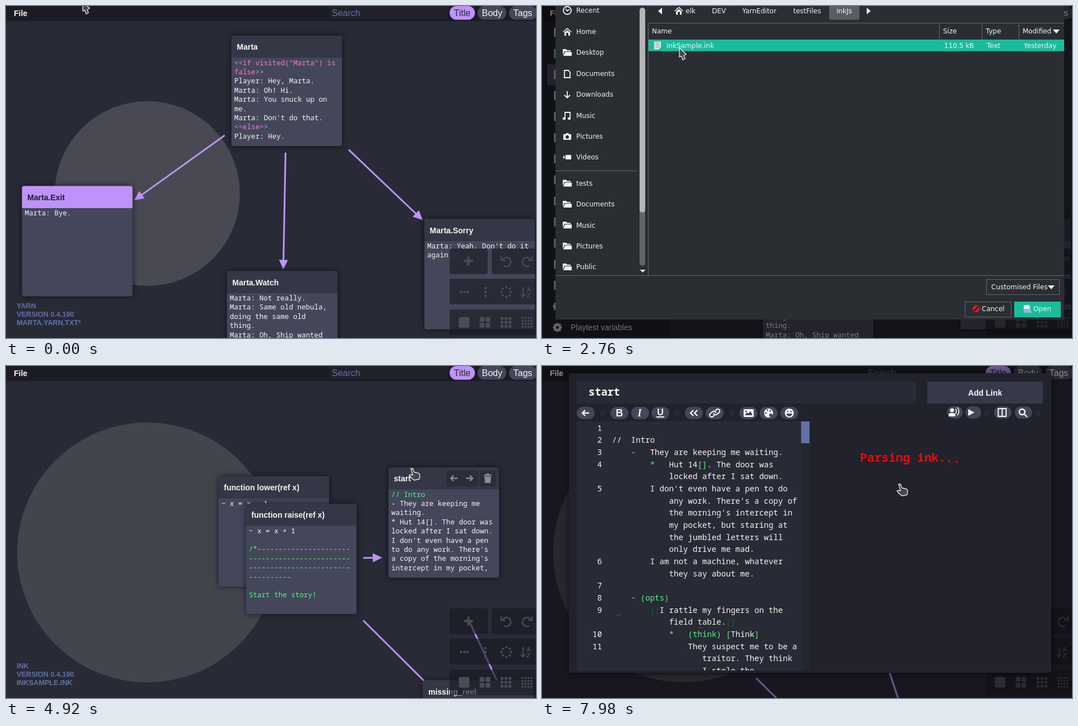
Recreate the animation shown at these times as an HTML page with a canvas. Size 945x593 px, loop 8000 ms.

```html
<!DOCTYPE html>
<html lang="en">
<head>
<meta charset="utf-8">
<title>Story editor</title>
<style>
html, body { margin: 0; width: 100%; height: 100%; overflow: hidden; background: #282a36; }
canvas { display: block; }
</style>
</head>
<body>
<canvas id="stage" width="945" height="593"></canvas>
<script>
const g = document.getElementById('stage').getContext('2d');
const SANS = '"Liberation Sans", Arial, sans-serif';
const MONO = '"Noto Sans Mono", "DejaVu Sans Mono", monospace';
const DIALOG = '"DejaVu Sans", sans-serif';
const BG = '#282a36', LIGHT = '#f8f8f2', PURPLE = '#bd93f9', BLUE = '#6272a4',
      GREEN = '#50fa7b', BODY = '#44475a', DARK = '#21222c', TEAL = '#1abc9c';
const LOOP = 8000, STEP = 60, NODE = 197;

// ---- helpers
const clamp = v => Math.max(0, Math.min(1, v));
const ramp = (t, a, b) => clamp((t - a) / (b - a));

function track(keys, t) {
  const i = keys.findIndex(k => k[0] > t);
  if (i === 0) return keys[0].slice(1);
  if (i < 0) return keys.at(-1).slice(1);
  const a = keys[i - 1], b = keys[i];
  const u = ramp(t, a[0], b[0]), e = u * u * (3 - 2 * u);
  return [a[1] + (b[1] - a[1]) * e, a[2] + (b[2] - a[2]) * e];
}

function box(x, y, w, h, color, r = 0) {
  g.fillStyle = color;
  g.beginPath();
  g.roundRect(x, y, w, h, r);
  g.fill();
}

function disc(x, y, r, color) {
  box(x - r, y - r, 2 * r, 2 * r, color, r);
}

// y is the middle of the capitals; the baseline sits on a whole pixel
function text(s, x, y, color, size, font = SANS, weight = '', align = 'left') {
  g.font = `${weight} ${size}px ${font}`;
  g.textAlign = align;
  g.fillStyle = color;
  g.fillText(s, x, Math.round(y + size * 0.36));
}

function path(d, x, y, fill, stroke, width = 2) {
  const p = new Path2D(d);
  g.save();
  g.translate(x, y);
  if (fill) { g.fillStyle = fill; g.fill(p); }
  if (stroke) { g.strokeStyle = stroke; g.lineWidth = width; g.stroke(p); }
  g.restore();
}

const line = (x1, y1, x2, y2, color, width = 1) =>
  path(`M${x1} ${y1}L${x2} ${y2}`, 0, 0, null, color, width);

function withAlpha(a, draw) {
  if (a <= 0) return;
  g.save();
  g.globalAlpha = a;
  draw();
  g.restore();
}

function shadowBox(...args) {
  g.save();
  g.shadowColor = 'rgba(0,0,0,.6)';
  g.shadowBlur = 12;
  box(...args);
  g.restore();
}

const LEFT = 'M6 0H-6M-1 -5L-6 0L-1 5', RIGHT = 'M-6 0H6M1 -5L6 0L1 5';
const PLAY = 'M-5 -6L6 0L-5 6Z';
const dim = a => box(0, 0, 945, 593, `rgba(0,0,0,${a})`);

// ---- graph
const yarnNodes = [
  { x: 402, y: 53, title: 'Marta', lines: ['<<if visited("Marta") is', 'false>>', 'Player: Hey, Marta.', 'Marta: Oh! Hi.',
    'Marta: You snuck up on', 'me.', "Marta: Don't do that.", '<<else>>', 'Player: Hey.'] },
  { x: 28.5, y: 321.5, title: 'Marta.Exit', selected: true, lines: ['Marta: Bye.'] },
  { x: 394, y: 473.5, title: 'Marta.Watch', lines: ['Marta: Not really.', 'Marta: Same old nebula,', 'doing the same old', 'thing.', 'Marta: Oh, Ship wanted'] },
  { x: 746, y: 380.5, title: 'Marta.Sorry', lines: ["Marta: Yeah. Don't do it", 'again.'] }
];
const dashes = '-'.repeat(24);
const inkNodes = [
  { x: 743.5, y: 561.5, title: 'missing_reel', lines: [] },
  { x: 379, y: 197, title: 'function lower(ref x)', lines: ['~ x = x - 1'] },
  { x: 428, y: 246, title: 'function raise(ref x)', lines: ['~ x = x + 1', '', '/*' + dashes.slice(2), dashes, dashes, dashes.slice(14), '', 'Start the story!'] },
  { x: 674, y: 242, title: 'start', lines: ['// Intro', '- They are keeping me', 'waiting.', '* Hut 14[]. The door was', 'locked after I sat down.',
    "I don't even have a pen", "to do any work. There's", "a copy of the morning's", 'intercept in my pocket,'] }
];

function bodyLine(s, x, y) {
  if (/^<<|>>$/.test(s)) {
    let at = x;
    for (const part of s.split(/(<<|>>)/)) {
      text(part, at, y, /<<|>>/.test(part) ? PURPLE : '#ff79c6', 12.55, MONO);
      at += g.measureText(part).width;
    }
  } else text(s, x, y, /^(\/\/|\/\*|--|Start)/.test(s) ? GREEN : LIGHT, 12.55, MONO);
}

function drawNode(n, hover) {
  const { x, y } = n;
  shadowBox(x, y, NODE, NODE, BODY, 4);
  box(x, y, NODE, 39.5, n.selected ? PURPLE : '#343746', [4, 4, 0, 0]);
  text(n.title, x + 9.5, y + 20, n.selected ? '#1c1d26' : LIGHT, 14, SANS, 'bold');
  n.lines.forEach((s, i) => bodyLine(s, x + 5, y + 48 + 16.4 * i));
  if (hover) {
    box(x + 103, y + 6, 57, 28, '#2b2d39', 3);
    box(x + 163, y + 6, 28, 28, '#2b2d39', 3);
    path(LEFT, x + 117, y + 19.5, null, '#8a8c94', 2.4);
    path(RIGHT, x + 144, y + 19.5, null, '#8a8c94', 2.4);
    path('M-7 -7H-3L-2 -9H2L3 -7H7V-5H-7ZM-6 -4H6L5 8H-5Z', x + 177, y + 20, '#8a8c94');
  }
}

// from centre to centre, trimmed at the padded node edges
function drawArrow(a, b) {
  const h = NODE / 2, ax = a.x + h, ay = a.y + h, bx = b.x + h, by = b.y + h;
  const dx = bx - ax, dy = by - ay, m = Math.max(Math.abs(dx), Math.abs(dy));
  const p = (h + 12) / m, q = 1 - (h + 3) / m, len = Math.hypot(dx, dy);
  const ex = ax + dx * q, ey = ay + dy * q, ux = dx / len, uy = dy / len;
  line(ax + dx * p, ay + dy * p, ex - ux * 14, ey - uy * 14, PURPLE, 3);
  g.save();
  g.translate(ex, ey);
  g.rotate(Math.atan2(dy, dx));
  path('M0 0L-17 -8V8Z', 0, 0, PURPLE);
  g.restore();
}

function drawYarn() {
  disc(252, 335, 165, '#484952');
  const [hub, ...rest] = yarnNodes;
  rest.forEach(n => drawArrow(hub, n));
  yarnNodes.forEach(n => drawNode(n));
}

const drag = [[4740, 0, 0], [4800, 3, -8], [4920, 8, -61], [5160, 8, -182]];
const pan = [[5220, 0, 0], [5340, -4, 43], [5400, -4, 43], [5880, -255, 103]];

function drawInk(t) {
  disc(252, 333, 232, '#43454d');
  withAlpha(ramp(t, 3720, 4080), () => {
    const [px, py] = track(pan, t), [dx, dy] = track(drag, t);
    g.save();
    g.translate(px, py);
    const raise = inkNodes[2], start = inkNodes[3];
    const moved = { ...start, x: start.x + dx, y: start.y + dy };
    const anchor = t < 5160 ? start : moved;
    drawArrow(raise, { x: 828, y: 644 });
    drawArrow(raise, anchor);
    drawArrow(anchor, { x: 908, y: 746 });
    inkNodes.slice(0, 3).forEach(n => drawNode(n));
    drawNode(moved, t >= 4680);
    g.restore();
  });
}

function drawTools() {
  const c = '#4a4c58';
  for (const [x, y, w] of [[791, 433, 68], [866, 433, 90], [791, 487, 160], [791, 542, 160]])
    box(x, y, w, 46, 'rgba(26,27,35,.64)', 4);
  path('M-8 0H8M0 -8V8', 824.5, 455.5, null, c, 4);
  for (const [x, s] of [[892, 1], [929, -1]]) {
    g.save();
    g.translate(x, 457);
    g.scale(s, 1);
    path('M-6 -5A8 8 0 1 1 -4 7M-9 -10V-3H-2', 0, 0, null, c, 2.4);
    g.restore();
  }
  for (let i = -1; i < 2; i++) {
    box(815 + i * 6, 509, 4, 4, c, 1);
    box(853, 509 + i * 7, 4, 4, c, 1);
  }
  for (let i = 0; i < 8; i++)
    disc(892 + 8.5 * Math.cos(i * Math.PI / 4), 511 + 8.5 * Math.sin(i * Math.PI / 4), 2, c);
  path('M-5 -9V8M-9 4L-5 9L-1 4', 927, 511, null, c, 2);
  text('A', 928, 506, c, 11, SANS, 'bold');
  text('Z', 928, 517, c, 11, SANS, 'bold');
  for (let n = 1; n < 5; n++) {
    const pitch = 21 / n, x = 796.5 + n * 37.3 - 26.5;
    for (let i = 0; i < n * n; i++)
      box(x + i % n * pitch, 555.5 + Math.floor(i / n) * pitch, pitch - 2, pitch - 2, c, n < 2 ? 3 : 1);
  }
}

function drawBar() {
  box(0, 0, 945, 27, '#1c1d24');
  text('File', 14, 13, LIGHT, 14, SANS, 'bold');
  box(579, 2, 208, 21, DARK);
  text('Search', 581, 12, BLUE, 16);
  for (const [s, x, w] of [['Title', 791, 45], ['Body', 841, 51], ['Tags', 897, 50]]) {
    const on = s === 'Title';
    box(x, 0, w, 24.5, on ? PURPLE : BODY, 12);
    text(s, x + 7.5, 12.5, on ? BG : LIGHT, 16);
  }
}

function drawLabel(t) {
  const file = t < 2940 ? 'MARTA.YARN.TXT*' : t < 5220 ? 'INKSAMPLE.INK' : 'INKSAMPLE.INK*';
  [t < 3780 ? 'YARN' : 'INK', 'VERSION 0.4.190', file]
    .forEach((s, i) => text(s, 19, 535.5 + i * 15.2, BLUE, 12.6, SANS, 'bold'));
}

// ---- file menu
const menuItems = ['Recent files', 'New file', 'Open file...', 'Open folder...', 'Append file...', 'Save', 'Save as yarn...', 'Save as json...',
  'Save as twee...', 'Save as xml...', 'Save as ink...', 'Export text...', 'Import...', 'Settings', 'Playtest variables'];

function drawMenu(cursorY) {
  shadowBox(9, 27, 214, 580, DARK);
  menuItems.forEach((s, i) => {
    const y = 47 + i * 37.65;
    if (Math.abs(cursorY - y) < 18) box(9, y - 18, 214, 37, BODY);
    const c = i === 1 ? GREEN : '#d0d0d4';
    if (i > 12) {
      for (let k = 0; k < 4; k++) {
        const a = k * Math.PI / 4, cx = 8 * Math.cos(a), cy = 8 * Math.sin(a);
        line(27.5 - cx, y - cy, 27.5 + cx, y + cy, c, 4);
      }
      disc(27.5, y, 6, c);
      disc(27.5, y, 2.6, DARK);
    } else path('M-6 -8H2L6 -4V8H-6Z', 27.5, y, c);
    text(s, 51, y, '#e6e6ea', 14);
  });
}

// ---- open dialog
const FOLDER = 'M-8 -6H-2L0 -4H6V-2H-5L-8 5ZM-4 -1H8V6H-7Z';
const HOME = 'M-8 0L0 -7L8 0L7 1L0 -5L-7 1ZM-5 1L0 -3L5 1V7H2V2H-2V7H-5Z';
const places = [
  ['Recent', 8, 'M7 0A7 7 0 1 1 -7 0A7 7 0 1 1 7 0M-3 -3L0 1L4 -2', 1], ['Home', 46, HOME], ['Desktop', 83, FOLDER],
  ['Documents', 121, 'M-5 -6H2L5 -3V7H-5Z', 1], ['Downloads', 158, 'M0 -6V6M-5 1L0 6L5 1', 1],
  ['Music', 196, 'M-4 4V-6H5V4M-7 4H-4V6H-7ZM2 4H5V6H2Z', 1],
  ['Pictures', 233, 'M-7 -4H-3L-2 -6H2L3 -4H7V6H-7ZM3 1A3 3 0 1 0 -3 1A3 3 0 1 0 3 1Z'],
  ['Videos', 270, 'M-3 -4H7V4H-3ZM-7 -3L-3 0L-7 3Z'],
  ...['tests', 'Documents', 'Music', 'Pictures', 'Public'].map((s, i) => [s, 316.5 + i * 37.4, FOLDER])
];
const files = `yarnExample.json,611 bytes,Program,5 Jun
stressTest.yarn,18.6 kB,Text,5 Jun
bbcodeTags.yarn,562 bytes,Text,5 Jun
Marta.yarn.txt,967 bytes,Text,5 Jun
shortcuts.json,825 bytes,Program,7 Jun
conditions.json,2.0 kB,Program,7 Jun
commandsandfunctions.json,1.2 kB,Program,7 Jun
assignment.json,2.0 kB,Program,7 Jun
htmlTags.yarn,562 bytes,Text,10 Jul
simple-xml-example.xml,451 bytes,Markup,25 Jul
links.json,1.3 kB,Program,25 Jul
inkJs,,,Yesterday`.split('\n').map(s => s.split(','));
const inkFiles = [['inkSample.ink', '110.5 kB', 'Text', 'Yesterday']];

function fileIcon(type, x, y) {
  if (!type) {
    box(x - 8, y - 6, 7, 4, '#4a90d0', 1);
    box(x - 8, y - 4, 16, 10, '#6cb0ea', 1);
  } else if (type === 'Program') {
    box(x - 6.5, y - 6.5, 13, 13, '#eee', 1);
    box(x - 5, y - 4, 10, 8, '#222');
    path('M-3 -2L-1 0L-3 2M0 2H3', x, y, null, '#fff', 1);
  } else {
    path('M-6 -7H6V3L2 7H-6Z', x, y, '#e8e8e8');
    if (type === 'Text') for (let i = 0; i < 4; i++) line(x - 4, y - 4.5 + i * 2.5, x + 4, y - 4.5 + i * 2.5, '#999');
    else path('M-2 -3L-5 0L-2 3M2 -3L5 0L2 3', x, y, null, '#d0455a', 1.2);
  }
}

function drawDialog(t) {
  const inside = t >= 1980, rule = '#64686c', white = '#f4f4f4';
  const say = (s, x, y) => text(s, x, y, white, 12, DIALOG);
  box(24, 0, 907, 560, '#2a2e33');

  for (const [s, y, d, outline] of places) {
    path(d, 45, y, outline ? null : white, outline ? white : null, 1.8);
    say(s, 61, y);
  }
  line(24, 294.5, 169, 294.5, rule);
  box(174, 3, 10, 461, '#62656a', 5);
  box(174, 3, 10, 366, '#b4b5b7', 5);
  path('M-5 -2H5L0 3Z', 179.5, 473, white);

  box(inside ? 512 : 435, -5, inside ? 54 : 74, 29.5, '#5a5e63', 3);
  path('M3 -6V6L-4 0Z', 211, 9, white);
  path(HOME, 244, 8.5, white);
  [['elk', 256], ['DEV', 303], ['YarnEditor', 357], ['testFiles', 448]].forEach(([s, x]) => say(s, x, 8.5));
  if (inside) say('inkJs', 525, 8.5);
  path('M-3 -6V6L4 0Z', inside ? 582 : 525, 9, white);

  line(190, 30.5, 931, 30.5, rule);
  line(24, 481.5, 931, 481.5, rule);
  line(189.5, 30, 189.5, 481, rule);
  for (const x of [708.5, 784.5, 850.5]) line(x, 31, x, 60, rule);
  [['Name', 196], ['Size', 715], ['Type', 791], ['Modified', 857]].forEach(([s, x]) => say(s, x, 45));
  path('M-6 -3H6L0 4Z', 917, 45, white);

  const picked = !inside && t >= 1740 ? 11 : 0;
  box(190, 60 + picked * 20.7, 741, 20.7, TEAL);
  (inside ? inkFiles : files).forEach(([name, size, type, date], i) => {
    const y = 70.5 + i * 20.65;
    fileIcon(type, 206, y);
    say(name, 222, y);
    say(size, 717, y);
    say(type, 793, y);
    say(date, 859, y);
  });

  const button = (x, y, w, fill) => {
    if (fill) box(x, y, w, 27, fill, 2);
    g.strokeStyle = fill || rule;
    g.lineWidth = 1;
    g.strokeRect(x + 0.5, y + 0.5, w - 1, 27);
  };
  button(792, 488, 131);
  say('Customised Files', 801, 502);
  path('M-6 -3H6L0 4Z', 908, 502, white);
  button(754, 528, 83);
  disc(774, 541, 6.5, '#c8202c');
  path('M-4 4L4 -4', 774, 541, null, '#400', 2);
  say('Cancel', 784, 541);
  button(842, 528, 83, t >= 2760 ? TEAL : t >= 2700 ? '#227568' : null);
  path('M-6 -7H3L5 -4V4H-6Z', 865, 541, '#eee');
  path('M-7 0H6L8 7H-5Z', 865, 541, '#8ab8e0');
  say('Open', 876, 541);
}

// ---- text editor; ^ toggles green, ` toggles dark green
const story = ['', '//  Intro', '    ^-^   They are keeping me waiting.',
  '        ^*^   Hut 14^[]^. The door was locked after I sat down.',
  "        I don't even have a pen to do any work. There's a copy of the morning's intercept in my pocket, but staring at the jumbled letters will only drive me mad.",
  '        I am not a machine, whatever they say about me.', '', '    ^- (opts)^',
  '        `{|`I rattle my fingers on the field table.`|}`',
  '            ^*^   ^(think) [^Think^]^',
  '                They suspect me to be a traitor. They think I stole the component from the machine.',
  '                They will be searching my bunk.', '                When they find nothing, they will ask me to talk.',
  '            ^*^   ^(plan) [^Plan^]^', '                What I am is a problem-solver.', '                Good with figures, quick to see a pattern.'];

function wrap(s, width) {
  const indent = s.search(/[^ ]|$/), hang = ' '.repeat(Math.min(indent + 4, 19));
  const rows = [], size = r => r.replace(/[\^`]/g, '').length;
  let row = s.slice(0, indent), first = true;
  for (const word of s.slice(indent).split(' ')) {
    const next = first ? row + word : row + ' ' + word;
    if (!first && size(next) > width) { rows.push(row); row = hang + word; }
    else row = next;
    first = false;
  }
  return [...rows, row];
}

function drawCode(cols) {
  let y = 110.5;
  story.forEach((s, i) => {
    text(i + 1, 107, y, LIGHT, 14.1, MONO, '', 'right');
    for (const row of wrap(s, cols)) {
      let x = 125, color = LIGHT;
      for (const part of row.split(/([\^`])/)) {
        if (part === '^') color = color === LIGHT ? GREEN : LIGHT;
        else if (part === '`') color = color === LIGHT ? '#0b6b1c' : LIGHT;
        else {
          text(part, x, y, color, 14.1, MONO);
          x += part.length * 8.46;
        }
      }
      y += 21.68;
    }
  });
}

function drawEditor(t) {
  const split = t >= 7380, right = split ? 462 : 878;
  shadowBox(48, 13, 860, 535, DARK, 4);
  box(62, 28, 605, 39, BG);
  text('start', 83, 46, LIGHT, 18.7, MONO, '600');
  box(687, 28, 206, 39, '#363949');
  text('Add Link', 790, 47.5, LIGHT, 14.2, SANS, 'bold', 'center');

  for (const x of [78, 138, 175, 211, 271, 308, 368, 404, 441]) box(x - 16, 73, 32, 22, BODY, 11);
  for (const x of [736, 768, 820, 857]) box(x - (x === 768 ? 13 : 14), 72, x > 800 ? 31 : 28, 22, BODY, 11);
  for (const x of [106, 239, 336, 791, 882]) {
    line(x, 79, x, 89, '#3c3f50');
    line(x + 4, 79, x + 4, 89, '#3c3f50');
  }
  path(LEFT, 78, 84, null, LIGHT, 2.4);
  text('B', 138, 84, LIGHT, 18, SANS, 'bold', 'center');
  text('I', 174, 84, LIGHT, 18, '"Liberation Serif", serif', 'italic bold', 'center');
  text('U', 211, 82.5, LIGHT, 16, SANS, 'bold', 'center');
  line(204, 91, 218, 91, LIGHT, 2);
  path('M-1 -5L-6 0L-1 5M6 -5L1 0L6 5', 271, 84, null, LIGHT, 2.4);
  path('M-1 4L-3 6A3.5 3.5 0 0 1 -8 1L-3 -3A3.5 3.5 0 0 1 2 0M1 -4L3 -6A3.5 3.5 0 0 1 8 -1L3 3A3.5 3.5 0 0 1 -2 0', 308, 84, null, LIGHT, 2);
  box(359.5, 77, 18, 14, LIGHT, 2);
  path('M-6 4V2L-3 -1L-1 1L3 -3L6 1V4Z', 368.5, 84, BODY);
  disc(364, 81, 1.6, BODY);
  disc(404, 84, 8, LIGHT);
  for (const [x, y] of [[399, 84], [402, 79], [407, 80]]) disc(x, y, 1.4, BODY);
  disc(408, 88, 3, BODY);
  disc(441, 84, 8, LIGHT);
  path('M-3 -4V-1M3 -4V-1', 441, 84, null, BODY, 1.8);
  path('M-5 1A5 5 0 0 0 5 1Z', 441, 84, BODY);
  disc(731, 79, 3.5, LIGHT);
  box(725, 84, 12, 6, LIGHT, [4, 4, 0, 0]);
  path('M0 -4A5 5 0 0 1 0 4M3 -7A9 9 0 0 1 3 7', 737, 81, null, LIGHT, 1.6);
  path(PLAY, 765, 83, LIGHT);
  path('M-7 -7H7V7H-7ZM0 -7V7', 820.5, 83, null, LIGHT, 2);
  path('M4 -1A5 5 0 1 1 -6 -1A5 5 0 1 1 4 -1M3 3L8 8', 857, 83, null, LIGHT, 2.4);

  g.save();
  g.beginPath();
  g.rect(62, 99, right - 62, 445);
  g.clip();
  box(62, 99, right - 62, 445, BG);
  drawCode(split ? 39 : 88);
  box(133, 444.5, 7, 1.6, '#f00');
  if (split) box(278, 466.5, 7, 1.6, '#f00');
  g.restore();

  box(right, 99, 15, 445, '#242630');
  box(right, 99, 15, 39, BLUE);
  if (split) {
    line(477.5, 138, 477.5, 544, '#2e303d');
    [...'Parsing ink...'].forEach((ch, i) => {
      const drop = i > 10 ? 2 + 2 * Math.sin((t - 7980) / 160 + i) : 0;
      text(ch, 567 + i * 12.75, 163 + drop, '#e80808', 21.2, MONO, '600');
    });
  }
}

// ---- pointer
const pointer = [[240, 137, -7], [540, 22, 8], [660, 22, 10], [1080, 62, 120], [1140, 62, 120], [1440, 290, 228], [1680, 290, 228],
  [1740, 246, 300], [2100, 246, 300], [2460, 245, 75], [2880, 245, 75], [3660, 427, 416], [3720, 427, 416], [4500, 690, 262], [4560, 690, 262],
  [4740, 711, 243], [4800, 714, 235], [4920, 719, 182], [5160, 719, 61], [5220, 713, 154], [5340, 709, 197], [5400, 709, 197],
  [5880, 456, 257], [6420, 456, 257], [7260, 757, 78], [7740, 757, 78], [7800, 634, 215], [7920, 634, 215], [7980, 633, 210]];
const ARROW = 'M0 0V16L3.5 14.5L6 21L10 19L8 13.5L12 11Z';
const HAND = 'M3 1L6 1L9 8L17 9.5L19 13L18 20L9 22L3 17L0 13L3 12L6 13Z';

function draw(now) {
  const t = Math.floor(now % LOOP / STEP) * STEP;
  const [mx, my] = track(pointer, t);
  box(0, 0, 945, 593, BG);
  if (t < 3780) drawYarn(); else drawInk(t);
  drawTools();
  if (t < 6180) drawLabel(t);
  drawBar();
  if (t >= 600 && t < 2940) drawMenu(t < 1140 ? my : 122);
  if (t >= 1140 && t < 3720) {
    dim(t < 2940 ? 0.5 * ramp(t, 1080, 1440) : 0.5 - 0.12 * ramp(t, 2880, 3120));
    withAlpha(ramp(t, 1080, 1320) * (1 - ramp(t, 2880, 3060)), () => drawDialog(t));
  }
  const open = ramp(t, 6060, 6300);
  dim(0.42 * open);
  withAlpha(open, () => drawEditor(t));
  path(t >= 4560 ? HAND : ARROW, mx, my, '#45474a', '#f0f0f0', 1.3);
}

function tick(now) {
  draw(now);
  requestAnimationFrame(tick);
}
requestAnimationFrame(tick);
</script>
</body>
</html>
```
